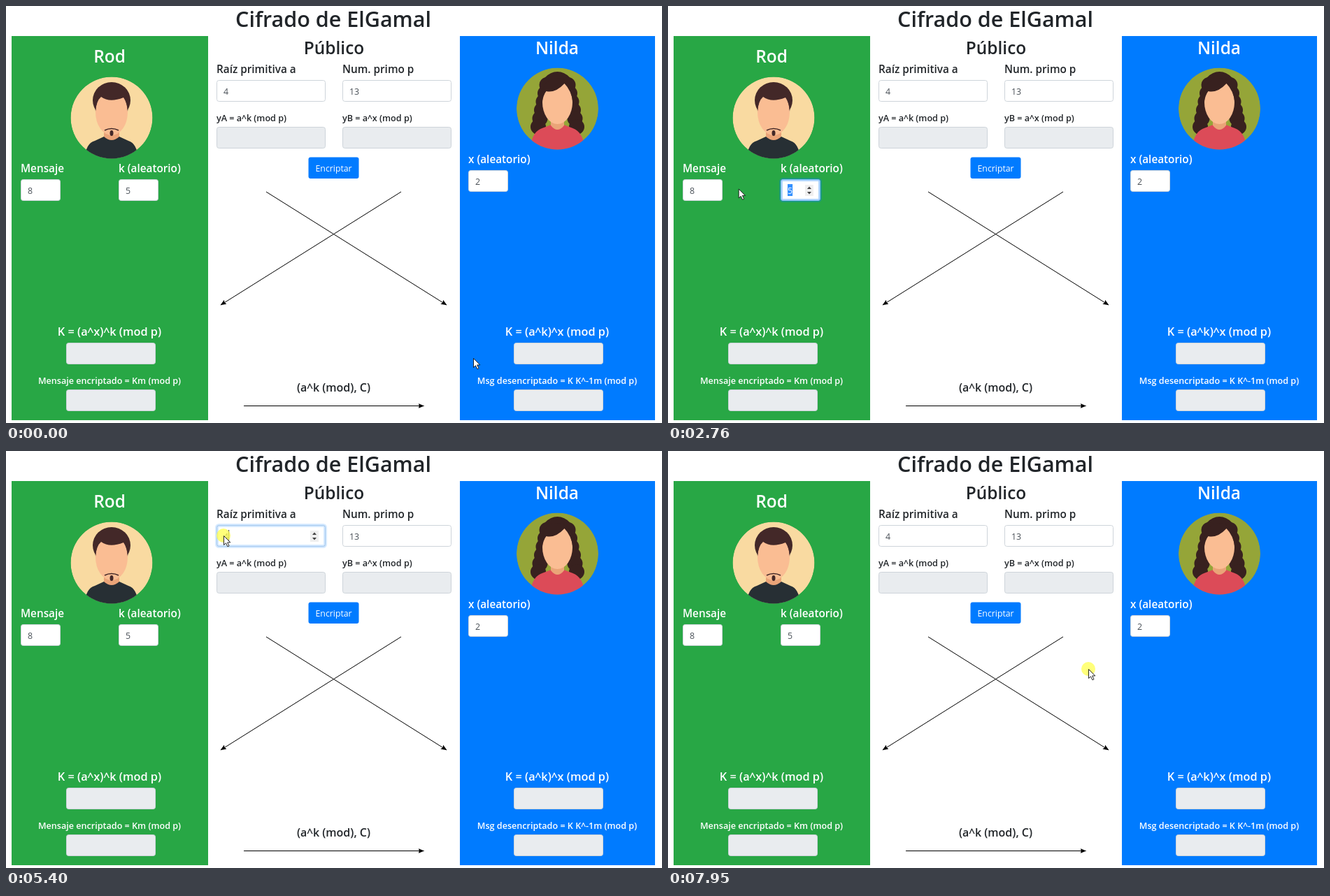
Recreate the animation shown at these times as an HTML page. Size 938 by 597 pixels, loop 8000 ms.

```html
<!DOCTYPE html>
<html lang="es">
<head>
<meta charset="utf-8">
<title>Cifrado de ElGamal</title>
<style>
html, body { margin: 0; width: 100%; height: 100%; overflow: hidden; background: #fff; }
svg { display: block; width: 938px; height: 597px; font-family: "Open Sans", "Noto Sans", sans-serif; }
.head { font-weight: 600; fill: #212529; }
.white { fill: #fff; }
.mid { text-anchor: middle; }
.skin { fill: #fabd93; }
.neck { fill: #eaa478; }
</style>
</head>
<body>
<svg viewBox="0 0 938 597">
  <defs>
    <clipPath id="disc"><circle r="58.5"/></clipPath>
    <marker id="tip" markerWidth="10" markerHeight="8" refX="8" refY="4" orient="auto" markerUnits="userSpaceOnUse">
      <path d="M0 .5L8.5 4L0 7.5L1.5 4Z"/>
    </marker>
  </defs>
  <rect x="8" y="43" width="281" height="550" fill="#28a745"/>
  <rect x="649" y="43" width="279" height="550" fill="#007bff"/>

  <g transform="translate(151 160)" clip-path="url(#disc)">
    <circle r="58.5" fill="#f9daa1"/>
    <path d="M-38 60Q-38 37 -24 33L-11 27H11L24 33Q37 37 38 60Z" fill="#272f34"/>
    <path class="neck" d="M-11 14H11V27Q0 37 -11 27Z"/>
    <ellipse cy="-25" rx="27" ry="26" fill="#432828"/>
    <ellipse class="skin" cy="-8" rx="23" ry="33"/>
    <path d="M-23 -9Q-28 -46 2 -48Q28 -44 23 -9Q22 -22 17 -29Q-3 -21 -15 -30Q-22 -24 -23 -9Z" fill="#432828"/>
    <path d="M-10 18Q0 13 10 18" fill="none" stroke="#432828" stroke-width="1.5"/>
    <ellipse cy="22" rx="2.5" ry="4" fill="#432828"/>
  </g>

  <g transform="translate(788.5 147)" clip-path="url(#disc)">
    <circle r="58.5" fill="#95a538"/>
    <g fill="#38211f"><ellipse cy="-25" rx="25" ry="28"/><g id="curls"></g></g>
    <path d="M-39 60Q-38 34 -22 28L-9 23H9L22 28Q38 34 39 60Z" fill="#dc4b58"/>
    <path class="neck" d="M-9.500 12H9.500V24Q0 36 -9.500 24Z"/>
    <ellipse class="skin" cy="-9" rx="21.500" ry="31"/>
    <path d="M-22 -9Q-25 -42 0 -44Q25 -41 22 -9Q20 -26 10 -36Q-3 -22 -16 -25Q-20 -20 -22 -9Z" fill="#38211f"/>
  </g>

  <g fill="none" stroke="#000">
    <path d="M372 266L630 428" marker-end="url(#tip)"/>
    <path d="M565 266L307 428" marker-end="url(#tip)"/>
    <path d="M340 572.5H597.5" marker-end="url(#tip)"/>
  </g>

  <g class="mid">
    <text class="head" x="468" y="30" font-size="30.5">Cifrado de ElGamal</text>
    <g font-size="24.4">
      <text class="head" x="469" y="69">Público</text>
      <text class="head white" x="148" y="81">Rod</text>
      <text class="head white" x="788" y="69">Nilda</text>
    </g>
    <text class="head" x="468.5" y="552" font-size="16">(a^k (mod), C)</text>
    <rect id="button" x="432.5" y="216.5" width="72" height="30.5" rx="3"/>
    <text class="white" x="468.6" y="237" font-size="12.3">Encriptar</text>
  </g>
  <g id="fields"></g>
  <circle id="click" r="10" fill="#ffff4d" opacity=".75"/>
  <path id="cursor" d="M.5 .5V13.5L3.5 10.8L5.9 15.8L8 14.8L5.7 9.9H9.8Z" fill="#fff" stroke="#111" stroke-width=".9"/>
</svg>
<script>
const $ = id => document.getElementById(id);
const LOOP = 8000;
const SMALL = 12.6, MEDIUM = 15.3, FORMULA = 16.3;

// Hair widens downwards in mirrored curls
$('curls').innerHTML = [...Array(12)].map((_, i) => {
  const row = i >> 1, side = i % 2 ? 1 : -1;
  return `<circle cx="${side * (15 + row * 2.5)}" cy="${row * 12 - 34}" r="11"/>`;
}).join('');

const field = (id, label, size, x, y, w, value = '') => ({ id, label, size, x, y, w, value });
const sidePanel = (x, key, result) => [
  field('', key, FORMULA, x, 482, 128),
  field('', result, SMALL, x, 549, 128)
];
const fields = [
  field('a', 'Raíz primitiva a', MEDIUM, 301, 106, 156, '4'),
  field('p', 'Num. primo p', MEDIUM, 481, 106, 156, '13'),
  field('', 'yA = a^k (mod p)', SMALL, 301, 173, 156),
  field('', 'yB = a^x (mod p)', SMALL, 481, 173, 156),
  field('m', 'Mensaje', MEDIUM, 21, 248, 57, '8'),
  field('k', 'k (aleatorio)', MEDIUM, 161, 248, 57, '5'),
  field('x', 'x (aleatorio)', MEDIUM, 661, 235, 57, '2'),
  ...sidePanel(86, 'K = (a^x)^k (mod p)', 'Mensaje encriptado = Km (mod p)'),
  ...sidePanel(726, 'K = (a^k)^x (mod p)', 'Msg desencriptado = K K^-1m (mod p)')
];

// Each click moves the focus: time in ms, field
const clicks = [[2290, 'k'], [3770, 'm'], [5320, 'a'], [5990, 'p'], [7870, null]];

// Pointer moves: start, end, target
const origin = [668, 504];
const moves = [
  [70, 900, 471, 232],
  [1660, 1970, 178, 262],
  [2480, 3000, 40, 261],
  [3070, 3900, 29, 262],
  [4390, 4770, 398, 150],
  [4770, 5240, 311, 121],
  [5480, 6010, 535, 121],
  [6170, 6480, 488, 121],
  [6480, 7650, 601, 312]
];

const clamp = v => Math.max(0, Math.min(1, v));
const ease = u => u * u * (3 - 2 * u);

function pointer(t) {
  let [x, y] = origin;
  for (const [start, end, toX, toY] of moves) {
    const u = ease(clamp((t - start) / (end - start)));
    x += (toX - x) * u;
    y += (toY - y) * u;
  }
  return [x, y];
}

const inside = ([px, py], x, y, w, h) => px >= x && px <= x + w && py >= y && py <= y + h;

function focusOf(id, t) {
  const i = clicks.findIndex(c => c[1] === id);
  if (i < 0) return { glow: 0 };
  const start = clicks[i][0], end = clicks[i + 1][0];
  const focused = t >= start && t < end;
  return {
    focused,
    selected: focused && t > start + 300,
    glow: t < end ? clamp((t - start) / 150) : clamp(1 - (t - end) / 80)
  };
}

function drawLabel({ label, size, x, y, w }) {
  const centred = w === 128, white = x < 289 || x > 649;
  return `<text class="head${white ? ' white' : ''}${centred ? ' mid' : ''}" x="${centred ? x + 62 : x}"
    y="${y - (size === SMALL ? 8.5 : 10)}" font-size="${size}">${label}</text>`;
}

function drawField(f, t, tip) {
  const { id, x, y, w, value } = f;
  const { focused, selected, glow } = focusOf(id, t);
  const box = `x="${x + .5}" y="${y + .5}" width="${w - 1}" height="30" rx="3"`;
  const textW = value.length * 7.1, left = x + 10;
  let s = drawLabel(f) + `<rect ${box} fill="${value ? '#fff' : '#e9ecef'}" stroke="#ced4da"/>`;
  if (glow > 0) {
    s += `<g fill="none" opacity="${glow}"><rect ${box} stroke="#007bff" stroke-opacity=".3" stroke-width="5"/>
      <rect ${box} stroke="#80bdff"/></g>`;
  }
  if (selected) s += `<rect x="${left}" y="${y + 7}" width="${textW}" height="17" fill="#3390ff"/>`;
  s += `<text x="${left}" y="${y + 21}" font-size="12.4" fill="${selected ? '#fff' : '#495057'}">${value}</text>`;
  if (focused && !selected) s += `<path d="M${left + textW + .5} ${y + 7}v17" stroke="#333"/>`;
  if (value && (inside(tip, x, y, w, 31) || (focused && w < 100))) {
    const r = x + w - 22;
    s += `<rect x="${r}" y="${y + 8}" width="12" height="16" fill="#efefef"/>
      <path d="M${r + 3} ${y + 14}l3 -3.5l3 3.5zm0 4h6l-3 3.5z" fill="#444"/>`;
  }
  return s;
}

function frame(now) {
  const t = now % LOOP, tip = pointer(t);
  $('fields').innerHTML = fields.map(f => drawField(f, t, tip)).join('');
  $('button').setAttribute('fill', inside(tip, 432, 216, 72, 31) ? '#0069d9' : '#007bff');
  for (const id of ['cursor', 'click']) $(id).setAttribute('transform', `translate(${tip})`);
  $('click').style.display = clicks.some(([c]) => t >= c && t < c + 130) ? '' : 'none';
  requestAnimationFrame(frame);
}
requestAnimationFrame(frame);
</script>
</body>
</html>
```
